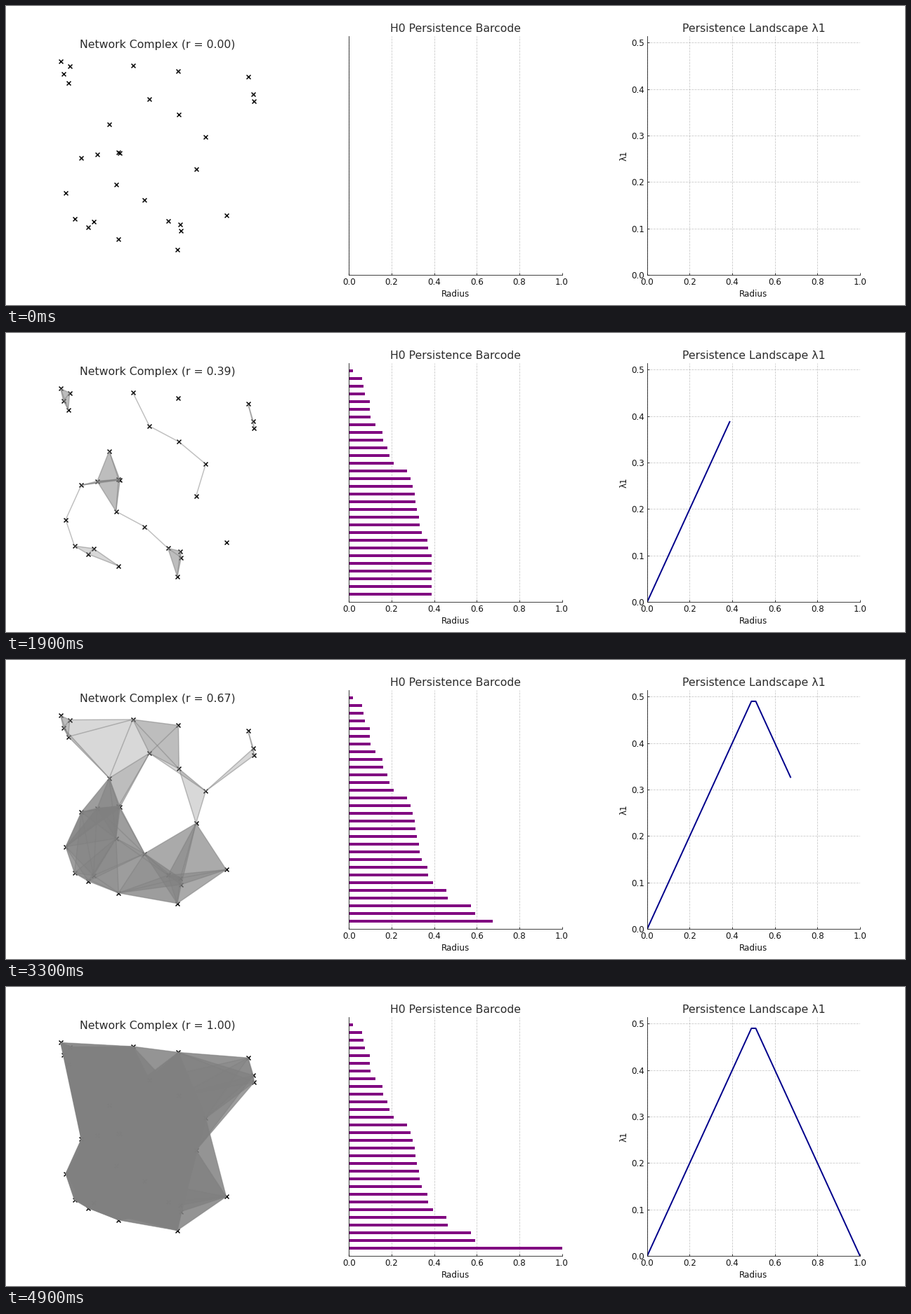
These frames come from a looping animation (1280 px wide and 427 px high, 5 s). A matplotlib script:

```python
from itertools import combinations

import matplotlib.pyplot as plt
import numpy as np
from matplotlib.animation import FuncAnimation
from matplotlib.collections import LineCollection, PolyCollection

WIDTH, HEIGHT = 1280, 427
DPI = WIDTH / 18
EPS = 1e-6  # keeps the pixel size from rounding down
STEPS = 50
INK = "#111111"

plt.rcParams.update({
    "font.family": "DejaVu Sans",
    "font.size": 12,
    "axes.titlesize": 16,
    "axes.titlecolor": "#2b2b2b",
    "axes.labelsize": 12,
    "axes.labelcolor": INK,
    "axes.edgecolor": INK,
    "axes.spines.top": False,
    "axes.spines.right": False,
    "axes.axisbelow": True,
    "xtick.direction": "in",
    "ytick.direction": "in",
    "xtick.color": INK,
    "ytick.color": INK,
    "grid.color": "#b0b0b0",
    "grid.linestyle": "--",
    "grid.linewidth": 0.8,
    "grid.alpha": 0.7,
})


def merge_radii(dist):
    """Edge lengths at which connected components merge (Kruskal)."""
    n = len(dist)
    label = list(range(n))
    deaths = []
    for i, j in sorted(combinations(range(n), 2), key=lambda e: dist[e]):
        if label[i] != label[j]:
            old, new = label[j], label[i]
            label = [new if v == old else v for v in label]
            deaths.append(dist[i, j])
    return deaths


def padded(values, margin=0.05):
    lo, hi = values.min(), values.max()
    pad = margin * (hi - lo)
    return lo - pad, hi + pad


np.random.seed(42)
points = 2 * np.random.rand(30, 2)
radii = np.linspace(0, 1, STEPS)
dist = np.linalg.norm(points[:, None] - points[None], axis=2)

edges = np.array(list(combinations(range(len(points)), 2)))
edge_birth = dist[edges[:, 0], edges[:, 1]]
triangles = np.array(list(combinations(range(len(points)), 3)))
a, b, c = triangles.T
triangle_birth = np.max([dist[a, b], dist[b, c], dist[a, c]], axis=0)

deaths = np.array(sorted(merge_radii(dist) + [1.0], reverse=True))
landscape = np.maximum(
    0, np.minimum(radii[:, None], deaths - radii[:, None])).max(axis=1)

fig, (net_ax, bar_ax, land_ax) = plt.subplots(
    1, 3, figsize=((WIDTH + EPS) / DPI, (HEIGHT + EPS) / DPI), dpi=DPI,
    facecolor="white")
fig.subplots_adjust(left=0.05, right=0.95, bottom=0.1, top=0.9, wspace=0.4)

# Network complex
net_ax.set_aspect("equal")
net_ax.axis("off")
net_ax.set_xlim(padded(points[:, 0]))
net_ax.set_ylim(padded(points[:, 1]))
net_ax.scatter(*points.T, marker="x", color="black", s=36, zorder=1)
faces = PolyCollection([], facecolors="gray", edgecolors="none",
                       alpha=0.3, zorder=1.1)
links = LineCollection([], colors="gray", linewidths=1.5, alpha=0.5, zorder=2)
net_ax.add_collection(faces, autolim=False)
net_ax.add_collection(links, autolim=False)
net_title = net_ax.set_title("Network Complex (r = 0.00)")

# Barcode
bar_ax.set_title("H0 Persistence Barcode")
bar_ax.set_yticks([])
bar_ax.set_ylim(-1, len(deaths))
bars = LineCollection([], colors="purple", linewidths=4, zorder=2)
bar_ax.add_collection(bars, autolim=False)

# Landscape
land_ax.set_title("Persistence Landscape λ1")
land_ax.set_ylabel("λ1")
land_ax.set_ylim(0, landscape.max() * 1.05)
curve, = land_ax.plot([], [], color="darkblue", lw=2)

for ax in (bar_ax, land_ax):
    ax.set_xlim(0, 1)
    ax.set_xlabel("Radius")
    ax.grid(True)


def update(step):
    r = radii[step]
    net_title.set_text(f"Network Complex (r = {r:.2f})")
    links.set_segments(points[edges[edge_birth <= r]])
    faces.set_verts(points[triangles[triangle_birth <= r]])
    bars.set_segments([[(0, y), (min(death, r), y)]
                       for y, death in enumerate(deaths)] if r > 0 else [])
    shown = step + 1 if step else 0
    curve.set_data(radii[:shown], landscape[:shown])
    return faces, links, bars, curve, net_title


anim = FuncAnimation(fig, update, frames=STEPS, init_func=lambda: update(0),
                     interval=100, repeat=True, repeat_delay=0, blit=False)
plt.show()
```
